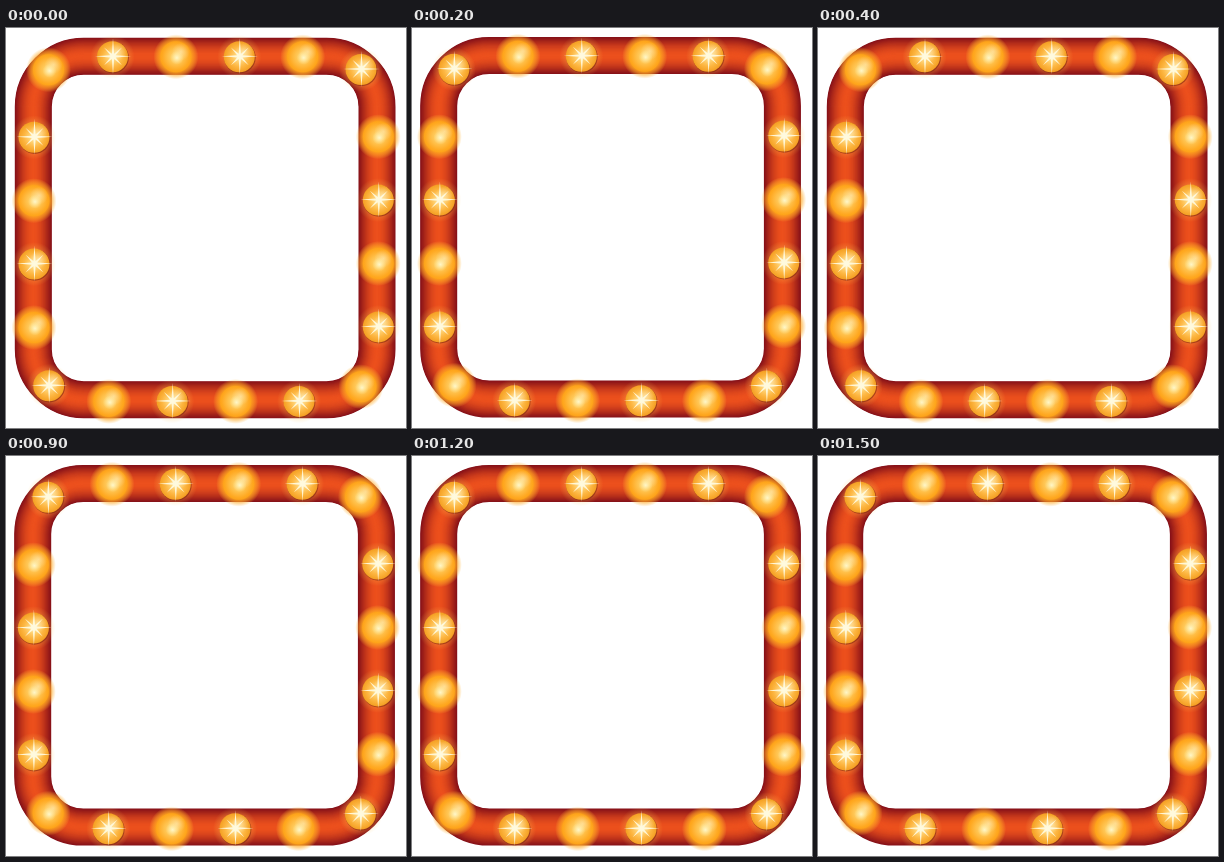
These frames come from a looping animation (400 by 400 pixels, 1.6 s). An HTML page with a canvas:

```html
<!DOCTYPE html>
<html>
<head>
<meta charset="utf-8">
<title>Marquee lights</title>
<style>
html, body { margin: 0; width: 100%; height: 100%; overflow: hidden; background: #fff; }
canvas { display: block; width: 400px; height: 400px; }
</style>
</head>
<body>
<canvas id="stage" width="400" height="400"></canvas>
<script>
const ctx = document.getElementById('stage').getContext('2d');
const TAU = Math.PI * 2;
const LOOP = 1600;
const SWITCHES = [200, 400, 900, 1400, 1500];
const GAP = 63.4;

// Each side, clockwise: its corner bulb, its first straight bulb, its direction.
const SIDES = [
  { corner: [42.5, 41.8], first: [106.5, 28.8], dir: [1, 0] },
  { corner: [355, 41.5], first: [372.3, 108.7], dir: [0, 1] },
  { corner: [355, 358.7], first: [293, 373.4], dir: [-1, 0] },
  { corner: [42.7, 357.8], first: [28, 299.5], dir: [0, -1] }
];
const BULBS = SIDES.flatMap(({ corner, first: [x, y], dir: [dx, dy] }) =>
  [corner, ...[0, 1, 2, 3].map(i => [x + dx * GAP * i, y + dy * GAP * i])]);

function disc(x, y, r, stops) {
  const g = ctx.createRadialGradient(x, y, 0, x, y, r);
  stops.forEach(([t, c]) => g.addColorStop(t, c));
  ctx.fillStyle = g;
  ctx.beginPath();
  ctx.arc(x, y, r, 0, TAU);
  ctx.fill();
}

// The tube is a stack of ever thinner strokes, dark edge to bright core.
function drawTube(shift) {
  for (let i = 0; i < 36; i++) {
    const t = i / 36, glow = Math.sin(t * TAU / 4);
    ctx.beginPath();
    ctx.roundRect(27.3 + shift, 28.2 + shift, 343.7, 343.5, 50.5);
    ctx.lineWidth = 37 * (1 - t);
    ctx.strokeStyle = `rgb(${134 + 102 * glow},${17 + 63 * glow},${25 + 4 * glow})`;
    ctx.stroke();
  }
}

function drawShine(x, y) {
  disc(x + 5, y - 5, 9, [[0, 'rgba(255,248,215,.5)'], [1, 'rgba(255,248,215,0)']]);
}

function drawGlow(x, y) {
  disc(x, y, 22.5, [
    [0, '#ffb020'], [0.66, 'rgba(255,170,28,.92)'],
    [0.82, 'rgba(255,168,36,.55)'], [1, 'rgba(255,180,50,0)']]);
  disc(x, y, 15.5, [
    [0, '#ffdc7c'], [0.5, '#ffc04a'], [0.85, '#ffaa24'], [1, 'rgba(255,164,24,.7)']]);
  drawShine(x, y);
  disc(x + 1, y + 1, 7, [[0, '#fff6c8'], [1, 'rgba(255,235,160,0)']]);
}

function drawStar(x, y, size) {
  ctx.fillStyle = 'rgba(255,252,228,.9)';
  ctx.beginPath();
  for (let i = 0; i < 16; i++) {
    const r = size * (i % 2 ? 0.16 : i % 4 ? 0.7 : 1);
    const a = i * TAU / 16;
    ctx.lineTo(x + r * Math.cos(a), y + r * Math.sin(a));
  }
  ctx.fill();
}

function drawSpark(x, y) {
  disc(x, y, 22, [[0.65, 'rgba(255,196,80,.3)'], [1, 'rgba(255,196,80,0)']]);
  disc(x + 0.6, y + 0.8, 15.8, [[0, '#a03c14'], [1, 'rgba(130,40,15,.6)']]);
  disc(x, y, 15.5, [
    [0, '#ffeeb0'], [0.3, '#ffd274'], [0.65, '#fdb641'], [1, '#f49f22']]);
  drawShine(x, y);
  drawStar(x + 0.5, y - 0.5, 18);
}

function draw(pose) {
  const shift = pose ? -0.6 : 0;
  ctx.fillStyle = '#fff';
  ctx.fillRect(0, 0, 400, 400);
  drawTube(shift);
  BULBS.forEach(([x, y], i) => {
    const paint = i % 2 === pose ? drawGlow : drawSpark;
    paint(x + shift, y + shift);
  });
}

const start = performance.now();
function tick() {
  const t = (performance.now() - start) % LOOP;
  draw(SWITCHES.filter(s => t >= s).length % 2);
  requestAnimationFrame(tick);
}
tick();
</script>
</body>
</html>
```
